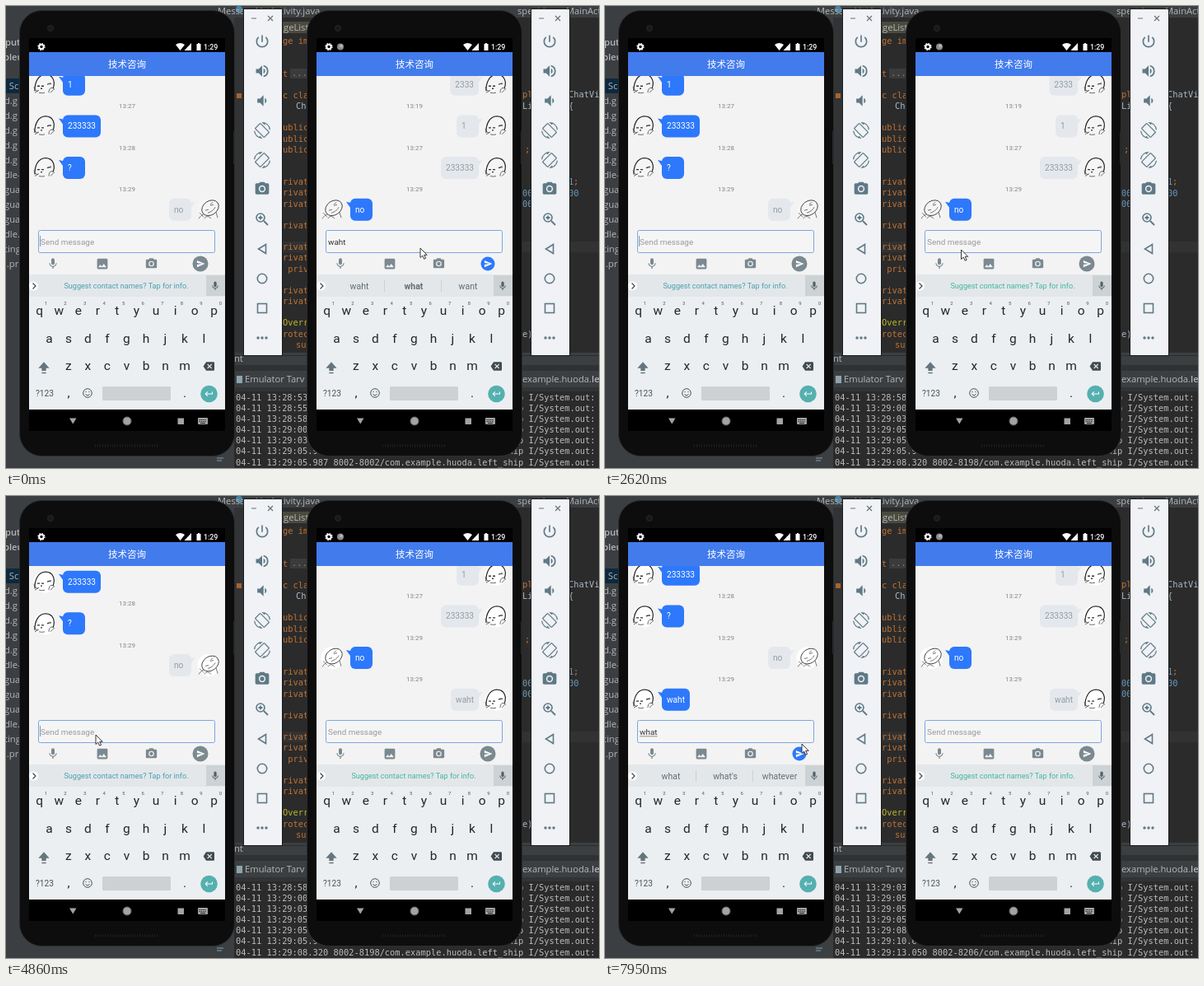
Recreate the animation shown at these times as an HTML page. Size 720 by 561 pixels, loop 8000 ms.

```html
<!DOCTYPE html>
<html lang="zh">
<head>
<meta charset="utf-8">
<title>Chat between two emulators</title>
<style>
html, body { margin: 0; width: 100%; height: 100%; overflow: hidden; background: #2b2b2b; }
svg { display: block; width: 720px; height: 561px; }
text { font-family: Roboto, sans-serif; white-space: pre; }
.mono { font-family: "DejaVu Sans Mono", monospace; font-size: 10.36px; }
.ui { font-family: "Open Sans", sans-serif; font-size: 11.2px; fill: #b4b7b9; }
.cjk { font-family: "Noto Sans CJK SC", "Noto Sans CJK", sans-serif; font-size: 11.5px; fill: #fff; }
.mid { text-anchor: middle; }
</style>
</head>
<body>
<svg id="stage" viewBox="0 0 720 561" xmlns="http://www.w3.org/2000/svg"></svg>
<script>
const LOOP = 8000, SHIFT = 349, PITCH = 50.65, BLINK = 492;

const paths = {
  mic: 'M12 14c1.66 0 3-1.34 3-3V5c0-1.66-1.34-3-3-3S9 3.34 9 5v6c0 1.66 1.34 3 3 3zm5.3-3c0 3-2.54 5.1-5.3 5.1S6.7 14 6.7 11H5c0 3.41 2.72 6.23 6 6.72V21h2v-3.28c3.28-.48 6-3.3 6-6.72z',
  image: 'M21 19V5c0-1.1-.9-2-2-2H5c-1.1 0-2 .9-2 2v14c0 1.1.9 2 2 2h14c1.1 0 2-.9 2-2zM8.5 13.5l2.5 3 3.5-4.5 4.5 6H5z',
  camera: 'M9 2 7.2 4H4a2 2 0 0 0-2 2v12a2 2 0 0 0 2 2h16a2 2 0 0 0 2-2V6a2 2 0 0 0-2-2h-3.2L15 2zM12 17a5 5 0 1 1 0-10 5 5 0 0 1 0 10zM12 8.8a3.2 3.2 0 1 0 0 6.4 3.2 3.2 0 0 0 0-6.4z',
  send: 'M2 21l21-9L2 3v7l15 2-15 2z',
  erase: 'M22 3H7L1 12l6 9h15a2 2 0 0 0 2-2V5a2 2 0 0 0-2-2zM19 15.6 17.6 17 14 13.4 10.4 17 9 15.6 12.6 12 9 8.4 10.4 7 14 10.6 17.6 7 19 8.4 15.4 12z',
  shift: 'M12 2 2 13h6v5h8v-5h6zM8 20.500h8v2.500H8z',
  enter: 'M19 7v4H5.83l3.58-3.59L8 6l-6 6 6 6 1.41-1.41L5.83 13H21V7z',
  power: 'M13 3h-2v10h2zM17.8 5.2l-1.4 1.4A7 7 0 1 1 7.6 6.6L6.2 5.2a9 9 0 1 0 11.6 0z',
  louder: 'M3 9v6h4l5 5V4L7 9zM16.5 12A4.5 4.5 0 0 0 14 8v8a4.5 4.5 0 0 0 2.5-4zM14 3.2v2.1a7 7 0 0 1 0 13.4v2.1a9 9 0 0 0 0-17.6z',
  softer: 'M5 9v6h4l5 5V4L9 9zM18.5 12A4.5 4.5 0 0 0 16 8v8a4.5 4.5 0 0 0 2.5-4z',
  rotate: 'M16.5 2.5A10.5 10.5 0 0 1 22.4 11H24A12 12 0 0 0 11.3 0l3.9 3.8zM10.2 1.75a1.5 1.5 0 0 0-2.1 0L1.75 8.1a1.5 1.5 0 0 0 0 2.1l12 12a1.500 1.500 0 0 0 2.100 0l6.400-6.350a1.500 1.500 0 0 0 0-2.100zM14.8 21.2 2.8 9.2 9.2 2.8l12 12zM7.5 21.500A10.500 10.500 0 0 1 1.600 13H0A12 12 0 0 0 12.700 24l-3.900-3.800z'
};

const rect = (x, y, w, h, fill, more = '') => `<rect x="${x}" y="${y}" width="${w}" height="${h}" fill="${fill}" ${more}/>`;
const dot = (x, y, r, fill, more = '') => `<circle cx="${x}" cy="${y}" r="${r}" fill="${fill}" ${more}/>`;
const text = (x, y, s, more = '') => `<text x="${x}" y="${y}" ${more}>${s}</text>`;
const line = (d, color, w = 1, more = '') => `<path d="${d}" fill="none" stroke="${color}" stroke-width="${w}" ${more}/>`;
const shape = (d, fill) => `<path d="${d}" fill="${fill}"/>`;
const icon = (name, x, y, size, fill, flip = 1) =>
  `<path transform="translate(${x} ${y}) scale(${flip * size / 24} ${size / 24}) translate(-12 -12)" d="${paths[name]}" fill="${fill}" fill-rule="evenodd"/>`;
const mono = (x, y, s, fill) => text(x, y, s, `class="mono" fill="${fill}"`);
const ui = (x, y, s, more = '') => text(x, y, s, `class="ui" ${more}`);

// The editor, project tree and log around the phones
function ide() {
  const panel = '#3c3f41', orange = '#c07334', plain = '#a9b7c6', blue = '#6897bb';
  let s = rect(0, 0, 720, 561, '#2b2b2b') + rect(0, 0, 278, 561, panel) + rect(0, 0, 720, 14, panel)
    + rect(277, 14, 12, 411, '#313335') + rect(336, 286, 384, 13, '#323232')
    + rect(336, 19, 40, 14, '#4b4a3e') + rect(0, 88, 20, 18, '#0d293e')
    + rect(280, 106, 6, 6, '#a8632d') + dot(283, 4, 4, '#4a86a8');
  s += ui(257, 10, 'MessageListActivity.java') + ui(621, 10, 'spect.java') + ui(680, 10, 'MainActi') + ui(337, 30, 'geList');
  s += ui(-1, 48, 'put', 'font-weight="600"') + ui(-3, 66, 'pleu', 'font-weight="600"');
  ['  Sc', 'd.g', 'd.g', 'd.g', 'd.g', 'd.g', 'dle-', 'gua', 'gua', 'gua', 'dle.', 'ting', 'l.pr']
    .forEach((w, i) => s += ui(-2, 101 + i * 17.97, w));
  [[0, 'ge im', orange], [3, 't', orange], [5, 'c class', orange], [8, 'ublic', orange], [9, 'ublic', orange],
   [10, 'ublic', orange], [13, 'rivate', orange], [14, 'rivate', orange], [15, 'rivate', orange], [17, 'rivate', orange],
   [19, 'rivate', orange], [20, 'rivate', orange], [21, ' private', orange], [23, 'rivate', orange], [24, 'rivate', orange],
   [26, 'Override', '#bbb529'], [27, 'rotected', orange]]
    .forEach(([row, w, c]) => s += mono(336, 46 + row * 13.17, w, c));
  s += rect(345, 76, 22, 12, '#3b3b3b') + mono(347, 85, '...', '#808080')
    + mono(352, 125, 'Ch', plain) + mono(352, 415, 'su', orange)
    + mono(627, 111, 'pl', orange) + mono(683, 111, 'ChatVi', plain) + mono(627, 125, 'Li', plain) + mono(683, 125, '{', plain)
    + mono(630, 178, ';', orange) + mono(683, 217, '1', blue) + mono(689, 217, ';', orange)
    + mono(627, 231, '00', blue) + mono(683, 231, '00', blue) + mono(627, 244, '00', blue) + mono(627, 402, 'e)', plain);
  s += rect(277, 421, 443, 15, panel) + rect(277, 436, 443, 7, '#2f3133') + rect(277, 443, 443, 20, panel)
    + rect(277, 463, 443, 5, '#313335') + rect(277, 468, 443, 93, '#2b2b2b') + rect(277, 424, 443, 1, '#2b2b2b');
  s += ui(277, 432, 'nt') + rect(280, 449, 7, 9, '#8fa3ad') + ui(290, 457, 'Emulator Tarv')
    + ui(627, 457, 'example.huoda.<tspan font-weight="600">left_ship</tspan>');
  return s + line('M256 549h8m-8 3h6', '#7aa0b8', 1.2) + '<g id="log"></g>';
}

function toolbar() {
  const c = '#5f7985', x = 311, edge = `stroke="${c}" stroke-width="1.6"`;
  let s = rect(288.5, 3.5, 47, 421, '#f0f2f5', 'stroke="#17191a"');
  s += line('M298 15h6m14-3 6 6m0-6-6 6', '#67737a', 1.2);
  [['power', 43], ['louder', 79], ['softer', 115], ['rotate', 151], ['rotate', 187, -1], ['camera', 222]]
    .forEach(([name, y, flip]) => s += icon(name, x, y, 20, c, flip));
  s += dot(309, 257, 5, 'none', edge) + line('M313 261l5 5M306.5 257h5m-2.5-2.5v5', c, 1.8);
  s += line('M315.5 289.5v11l-9-5.5z', c, 1.6) + dot(x, 331, 5.7, 'none', edge) + rect(305.5, 361.5, 11, 11, 'none', edge);
  [-5, 0, 5].forEach(d => s += dot(x + d, 403, 1.7, c));
  return s;
}

const doodles = [
  line('M-12 8C-12.5 -2 -8 -12 1 -12C11 -12 13 -2 10 5', '#222', 1.2)
    + line('M-13 3q1 5 5 5M-12 10l5-3M5 10C5 5 8 2 12 6M7 10l4-4M-7 10q4 1 7 0', '#444', .8)
    + line('M-9 2h3m2 0h3M3 0l3-1M-5 5h2M7 -2v2', '#333', 1.3),
  '<ellipse cx="2" cy="-2" rx="11" ry="8.5" transform="rotate(-35 2 -2)" fill="none" stroke="#444" stroke-width=".9"/>'
    + line('M-12 11C-9 7 -7 5 -5 6M-5 11C-4 8 0 7 3 11M-11 4l5 5M9 3l2 7M-4 1l4-1M2 -5l4 -1M-1 4C3 3 7 0 8 -3M5 -9l-3 3', '#666', .9)
];

// One message with its time stamp, centred on y = 0
function item([words, time, mine, face]) {
  const em = { '?': .472, w: .751, a: .544, h: .551, t: .327, n: .552, o: .57 };
  const w = Math.max(27, 12 + 10.1 * [...words].reduce((n, c) => n + (em[c] || .5615), 0));
  const x = mine ? 225 - w : 69, fill = mine ? '#e4e8ec' : '#2d78fb';
  return text(147, -21.9, time, 'class="mid" font-size="8" fill="#858585"')
    + shape(mine ? 'M223 -8l7 -1.5-5 7z' : 'M71 -8l-7 -1.5 5 7z', fill)
    + rect(x, -13.5, w, 27, fill, 'rx="6"')
    + text(x + 6, 3.4, words, `font-size="10.1" fill="${mine ? '#929ba4' : '#fff'}"`)
    + `<g transform="translate(${mine ? 246 : 47} 0)">` + dot(0, 0, 13.5, '#fff', 'class="disc"') + doodles[face] + '</g>';
}

function keyboard() {
  const ink = '#4a5459';
  let s = rect(28, 326, 238, 164, '#eceff1') + rect(28, 326, 238, 27, '#e3e7ea') + rect(243, 327, 23, 25, '#cdd2d5')
    + dot(33.5, 340, 5.5, '#fff') + line('M32.5 336.5l3.5 3.5-3.5 3.5', '#444', 1.2) + icon('mic', 254, 340, 13, '#52616a');
  const key = (x, y, k) => text(x, y, k, 'class="mid" font-size="15.5" fill="#22272a"');
  [...'qwertyuiop'].forEach((k, i) => {
    s += key(40.7 + i * 23.55, 375, k) + text(48.5 + i * 23.55, 363, (i + 1) % 10, 'class="mid" font-size="6" fill="#555"');
  });
  [...'asdfghjkl'].forEach((k, i) => s += key(52.4 + i * 23.5, 408.5, k));
  [...'zxcvbnm'].forEach((k, i) => s += key(75.8 + i * 23.55, 442, k));
  return s + icon('shift', 46, 439, 16, '#66757d') + icon('erase', 246, 437.5, 14, '#414b50')
    + text(36, 474, '?123', `font-size="10.2" fill="${ink}"`) + key(76, 475, ',') + key(217, 475, '.')
    + dot(99, 470, 5.3, 'none', `stroke="${ink}"`) + line('M96.5 471.5q2.5 3 5 0M97 467.8v1.4m4-1.4v1.4', ink)
    + rect(117, 462, 83, 17, '#cdd1d4', 'rx="1.5"') + dot(246.5, 471, 10.3, '#55b0b0') + icon('enter', 246.5, 471, 12, '#fff');
}

function phone(id, dx, messages, tipColor) {
  let s = `<g id="${id}" transform="translate(${dx} 0)">`;
  s += rect(16.5, 5.5, 261, 541, '#0d0d0e', 'rx="27" stroke="#2a2c2e"') + rect(276, 152, 2, 40, '#26282a')
    + dot(54, 27, 3.5, '#17191c', 'stroke="#24282c"') + line('M108 534h78', '#222', 3, 'stroke-dasharray="1 2"');
  s += rect(28, 39, 238, 477, '#000') + dot(43, 49.5, 2.7, 'none', 'stroke="#fff" stroke-width="2"')
    + dot(43, 49.5, 4, 'none', 'stroke="#fff" stroke-width="1.3" stroke-dasharray="1.6 1.54"');
  if (dx) s += dot(57, 49.5, 4, '#8a8a8a') + dot(58, 48.5, 2, '#b5b5b5');
  s += shape('M206 47q5.5-4 11 0l-5.5 7z', '#fff') + shape('M225 45v9h-8.5z', '#fff') + rect(231.5, 46, 5, 8, '#fff') + rect(233, 45, 2, 1.5, '#fff')
    + text(240, 53, '1:29', 'font-size="8.8" font-weight="500" fill="#fff"');
  s += rect(28, 85, 238, 241, '#f3f3f4') + '<g clip-path="url(#view)"><g class="list">';
  messages.forEach((m, i) => s += `<g class="item" transform="translate(0 ${247.2 - (3 - i) * PITCH})">${item(m)}</g>`);
  s += '</g></g>' + rect(28, 56, 238, 29, '#427bec') + text(147, 75.4, '技术咨询', 'class="cjk mid"');
  s += rect(39.5, 272.5, 214, 27, '#f5f5f6', 'rx="2" stroke="#7da6dc"')
    + text(42, 289.5, '', 'class="field" font-size="9.95"') + rect(42, 291.5, 21, .7, '#666', 'class="under"')
    + rect(41, 279, 1, 13, '#7f99ab', 'class="caret"');
  const grey = '#7b8990', nav = '#a3a3a3';
  s += icon('mic', 57, 313, 16, grey) + icon('image', 117, 313, 17, grey) + icon('camera', 176.5, 313, 16, grey)
    + dot(236, 313, 24, '#000', 'class="ripple" opacity="0"')
    + dot(236, 313, 9.5, grey, 'class="button"') + icon('send', 236.5, 313, 11, '#fff');
  s += keyboard() + text(146, 343.3, 'Suggest contact names? Tap for info.', `class="tip mid" font-size="9.12" fill="${tipColor}"`);
  s += '<g class="words">' + line('M110.5 333v14m69-14v14', '#cbd0d3');
  [80, 146, 212].forEach(x => s += text(x, 343.7, '', 'class="word mid" font-size="10.5" fill="#626d73"'));
  s += '</g>' + shape('M77 500.5h8.5l-4.25 7z', nav) + dot(147, 504, 5, nav, 'stroke="#666"') + rect(208.5, 500.5, 7.5, 7.5, nav)
    + rect(233, 500, 12, 8, nav, 'rx="1"') + line('M234.5 502.5h9m-9 2h9', '#000', .9, 'stroke-dasharray="1.2 1"') + line('M236 506.5h6', '#000', .8);
  return s + '</g>';
}

const stage = document.getElementById('stage');
stage.innerHTML = '<defs><clipPath id="view"><rect x="28" y="85" width="238" height="181"/></clipPath></defs>' + ide()
  + phone('left', 0, [['1', '13:26', 0, 0], ['233333', '13:27', 0, 0], ['?', '13:28', 0, 0], ['no', '13:29', 1, 1], ['waht', '13:29', 0, 0]], '#4a9fb0')
  + toolbar()
  + phone('right', SHIFT, [['2333', '13:18', 1, 0], ['1', '13:19', 1, 0], ['233333', '13:27', 1, 0], ['no', '13:29', 0, 1], ['waht', '13:29', 1, 0]], '#42b59f')
  + `<g transform="translate(${SHIFT} 0)">${toolbar()}</g>`
  + '<path id="mouse" d="M0 0v11.5l2.7-2.4 1.9 4.1 2-.9-1.9-4h3.5z" fill="#fff" stroke="#222" stroke-width=".9"/>';

const clamp = v => Math.min(1, Math.max(0, v));
const last = (list, t) => list.filter(e => e[0] <= t).pop();
const smooth = v => .5 - .5 * Math.cos(Math.PI * clamp(v));

const logs = ['28:53.402 8002-8002', '28:55.719 8002-8002', '28:58.041 8002-8002', '29:00.377 8002-8002', '29:03.684 8002-8002', '29:05.980 8002-8002',
  '29:05.987 8002-8002', '29:05.995 8002-8002', '29:08.320 8002-8198', '29:10.613 8002-8200', '29:13.050 8002-8206'];
const logTimes = [80, 2450, 5320, 7750];

const track = [[0, 503, 294], [300, 503, 294], [700, 547, 324], [850, 547, 324], [1250, 590, 315], [2330, 590, 315],
  [2620, 433, 296], [3200, 150, 289], [3500, 109, 290], [7400, 109, 290], [7900, 239, 301], [8000, 239, 301]];

const typed = {
  left: [[0, ''], [6100, 'w', 'w', 'what', 'we'], [6180, 'wh', 'what', 'who', 'why'], [6260, 'wha', 'what', 'wha', 'whatever'],
    [6710, 'what', 'what', "what's", 'whatever']],
  right: [[0, 'waht', 'waht', 'what', 'want'], [1690, '']]
};
const scrollAt = { left: 4680, right: 3060 };
const blinkAt = { left: 4480, right: 4090 };

const views = ['left', 'right'].map(id => {
  const root = document.getElementById(id), $ = c => root.querySelector('.' + c), all = c => [...root.querySelectorAll('.' + c)];
  return { id, list: $('list'), fresh: all('item')[4], discs: all('disc'), field: $('field'), under: $('under'), caret: $('caret'),
    button: $('button'), ripple: $('ripple'), tip: $('tip'), words: $('words'), word: all('word') };
});
const log = document.getElementById('log'), mouse = document.getElementById('mouse');
const show = (el, on) => el.setAttribute('visibility', on ? 'visible' : 'hidden');
let shown = -1;

function drawPhone(v, t) {
  const start = scrollAt[v.id];
  v.list.setAttribute('transform', `translate(0 ${-PITCH * smooth((t - start) / 250)})`);
  v.fresh.setAttribute('opacity', clamp((t - start - 250) / 120));
  v.discs.forEach(d => d.setAttribute('fill', t < start ? '#f5f5f6' : '#fff'));

  const [, words, ...hints] = last(typed[v.id], t), full = words !== '';
  v.field.textContent = words || 'Send message';
  v.field.setAttribute('fill', full ? '#333' : '#9a9a9a');
  const width = full ? v.field.getComputedTextLength() : 0;
  v.under.setAttribute('width', width);
  show(v.under, full && (v.id === 'left' || t >= 310));
  v.caret.setAttribute('x', 41 + (full ? width + 1 : 0));
  show(v.caret, Math.floor((t - blinkAt[v.id]) / BLINK) % 2 === 0);
  v.button.setAttribute('fill', full ? '#2d78fb' : '#7b8990');
  v.button.setAttribute('r', full ? 8.5 : 9.5);
  show(v.tip, !full);
  show(v.words, full);
  v.word.forEach((w, i) => {
    w.textContent = hints[i] || '';
    w.setAttribute('font-weight', i === 1 && v.id === 'right' ? 700 : 400);
  });
  const press = (t - 1470) / 220;
  v.ripple.setAttribute('r', 8 + 16 * clamp(press));
  v.ripple.setAttribute('opacity', v.id === 'right' && press > 0 && press < 1 ? .1 * (1 - press * .6) : 0);
}

function draw(now) {
  const t = now % LOOP;
  views.forEach(v => drawPhone(v, t));

  const first = logTimes.filter(e => e <= t).length;
  if (first !== shown) {
    shown = first;
    log.innerHTML = logs.slice(first, first + 7).map((l, i) =>
      mono(279, 478.5 + i * 13.17, `04-11 13:${l}/com.example.huoda.left_ship I/System.out:`, '#bbbbbb')).join('');
  }

  const i = Math.max(1, track.findIndex(p => p[0] > t)), [ta, xa, ya] = track[i - 1], [tb, xb, yb] = track[i];
  const k = (t - ta) / (tb - ta);
  mouse.setAttribute('transform', `translate(${xa + (xb - xa) * k} ${ya + (yb - ya) * k})`);
  requestAnimationFrame(() => draw(performance.now()));
}
draw(performance.now());
</script>
</body>
</html>
```
